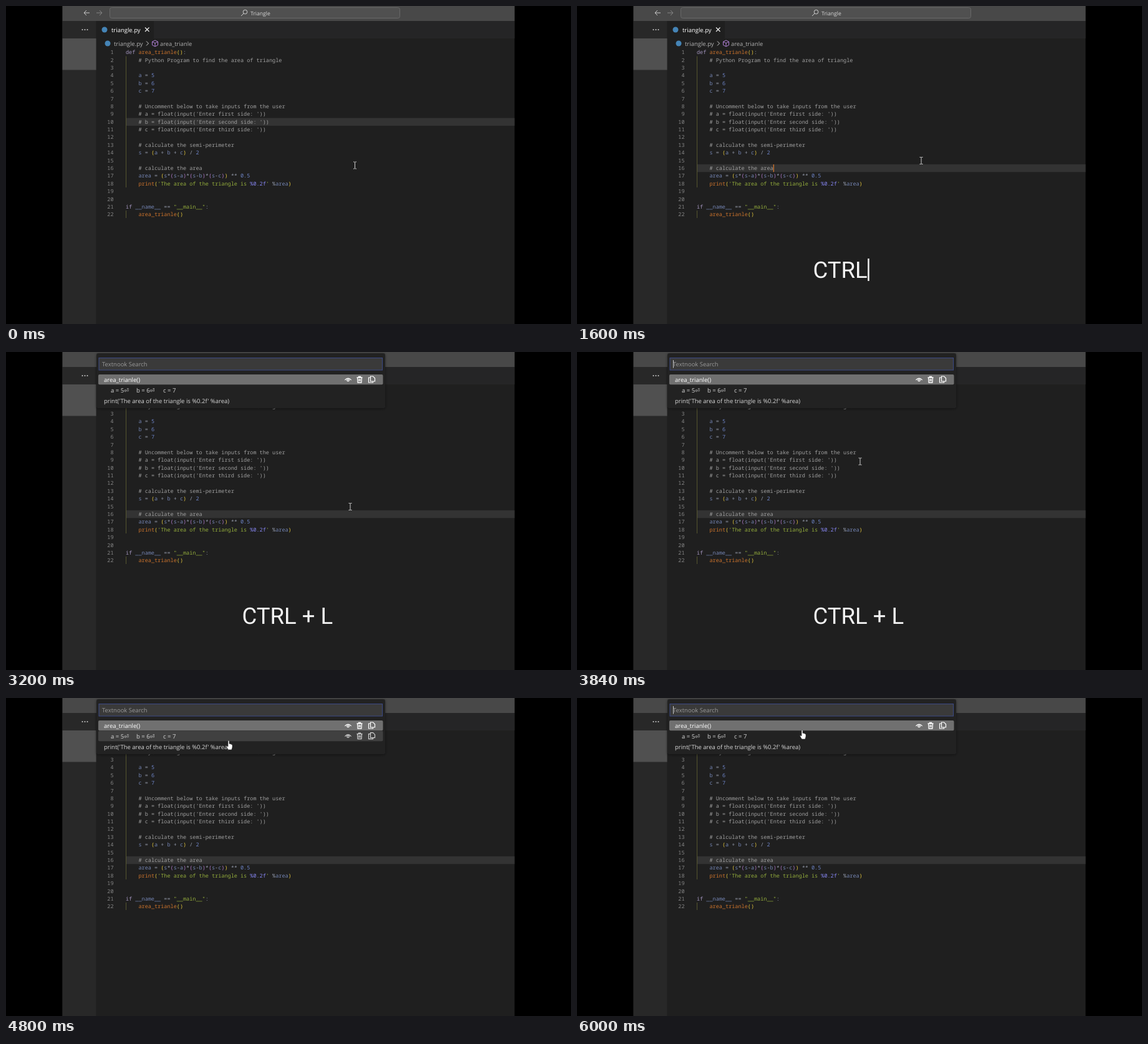
Write an HTML page that moves like this. It is 906 by 510 pixels and loops after 6.24 s.

```html
<!DOCTYPE html>
<html lang="en">
<head>
<meta charset="utf-8">
<title>Clipboard search in an editor</title>
<style>
html, body { margin: 0; width: 100%; height: 100%; overflow: hidden; background: #000; }
svg { display: block; }
text { white-space: pre; text-rendering: geometricPrecision; font: 9.5px "Open Sans", sans-serif; fill: #d6d6d6; }
.code text { font: 8.53px "Noto Sans Mono", monospace; }
.num { text-anchor: end; fill: #858585 !important; }
.line { fill: none; stroke: #ccc; }
.keyword { fill: #a294bd; }
.call { fill: #cc732c; }
.name { fill: #7485b4; }
.number { fill: #6d84c6; }
.string { fill: #94ad3c; }
.format { fill: #8585f0; font-weight: 500; }
.comment { fill: #a0a0a0; }
.op { fill: #9298a8; }
.b1 { fill: #e6c83c; }
.b2 { fill: #b27acb; }
#keys { font: 36.5px Roboto, sans-serif; fill: #f4f4f4; }
</style>
</head>
<body>
<svg width="906" height="510" viewBox="0 0 906 510">
  <defs>
    <filter id="shadow" x="-10%" y="-20%" width="120%" height="150%">
      <feDropShadow dx="0" dy="1" stdDeviation="2" flood-color="#000" flood-opacity=".45"/>
    </filter>
    <g id="actions" class="line" style="stroke:#fff">
      <path d="M-5 1Q0-5 5 1" stroke-width="1.200"/><circle cy="1" r="1.700" stroke-width="1.300"/>
      <path d="M14-3h9M17-3v-1.500h3V-3M15-3l.6 8h5.800l.6-8M17.500-1v4M19.500-1v4" stroke-width="1.300"/>
      <path d="M36-5h4l3 3v5h-7zM36-3h-3v8h7v-2" stroke-width="1.200"/>
    </g>
  </defs>

  <rect x="90.500" width="725" height="510" fill="#1f1f1f"/>
  <rect x="90.500" width="725" height="24" fill="#484848"/>
  <rect x="90.500" y="24" width="725" height="28" fill="#252526"/>
  <rect x="90.500" y="24" width="54" height="486" fill="#282828"/>
  <rect x="90.500" y="52" width="54" height="50.500" fill="#505050"/>
  <rect x="144.500" y="24" width="92.500" height="28" fill="#1f1f1f"/>
  <g fill="#ccc"><circle cx="122.500" cy="38" r="1"/><circle cx="126.500" cy="38" r="1"/><circle cx="130.500" cy="38" r="1"/></g>

  <g id="title">
    <rect x="166.500" y="2.500" width="465" height="17" rx="3" fill="#505050" stroke="#686868"/>
    <path class="line" d="M134 11h-9m4-4l-4 4l4 4"/>
    <path class="line" d="M145 11h9m-4-4l4 4l-4 4" style="stroke:#858585"/>
    <g class="line"><circle cx="383.500" cy="9.500" r="3.300"/><path d="M381 12l-4 4"/></g>
    <text x="392" y="15" style="font-size:8.600px">Triangle</text>
  </g>
  <circle cx="158" cy="38" r="4.500" fill="#4584b6"/>
  <text x="169" y="41.500" style="fill:#fff;font-weight:500">triangle.py</text>
  <path class="line" style="stroke:#eee" d="M223 34.500l6.500 6.500m0-6.500l-6.500 6.500" stroke-width="1.200"/>
  <circle cx="163" cy="60" r="4.500" fill="#4584b6"/>
  <text x="173" y="63.500" style="fill:#b0b0b0">triangle.py</text>
  <path class="line" d="M225 56.500l3.500 3.500l-3.500 3.500"/>
  <path class="line" style="stroke:#b180d7" d="M239 55l4.500 2.300v5.400l-4.500 2.300l-4.500-2.300v-5.400zM234.500 57.300l4.500 2.300l4.500-2.300M239 59.600v5.400"/>
  <text x="247" y="63.500" style="fill:#b0b0b0;font-size:9.300px">area_trianle</text>

  <rect id="current" x="192" width="623.500" height="12.400" fill="#333"/>
  <path d="M192.500 80.500V291M192.500 328V340" stroke="#55552f"/>
  <g id="code" class="code"></g>
  <rect id="caret" x="314.700" y="254" width="1.200" height="12.300" fill="#e07b2c"/>

  <g id="popup">
    <rect x="145" y="2" width="463" height="88" rx="3" fill="#222223" filter="url(#shadow)"/>
    <rect x="149" y="9.500" width="454.500" height="19.500" fill="#3a3a3a" stroke="#3c4a86"/>
    <text x="154" y="23" style="fill:#999">Textnook Search</text>
    <rect id="inputCaret" x="154" y="13" width="1" height="12.500" fill="#ccc"/>
    <rect x="148" y="36" width="456.500" height="16.300" rx="2" fill="#707070"/>
    <g id="hover">
      <rect x="148" width="456.500" height="16.800" rx="2" fill="#404040"/>
      <use href="#actions" x="548.500" y="8.300" opacity=".75"/>
    </g>
    <use href="#actions" x="548.500" y="44"/>
    <text x="157" y="47.500" style="fill:#fff">area_trianle()</text>
    <text x="168" y="64.500">a = 5⏎</text><text x="209" y="64.500">b = 6⏎</text><text x="252" y="64.500">c = 7</text>
    <text x="157" y="82">print('The area of the triangle is %0.2f' %area)</text>
  </g>

  <text id="keys" x="378.500" y="436"></text>
  <rect id="keysCaret" y="405" width="2.500" height="36" fill="#eee"/>
  <path id="beam" class="line" d="M-2.500-5.500H-.8L0-4.800L.8-5.500H2.500M0-4.800V4.800M-2.500 5.500H-.8L0 4.800L.8 5.500H2.500"/>
  <path id="hand" fill="#fff" stroke="#222" stroke-width=".6" d="M-1 1Q0-.8 1 1V5.500Q2 4.500 2.800 6Q4 5.200 4.500 6.500Q6 6 6 8V11L4.800 15H-.5L-3.500 10Q-3 8-1 10Z"/>
</svg>
<script>
const LOOP = 6240, STEP = 80, PITCH = 12.38, CHAR = 5.12;
const $ = id => document.getElementById(id);
const source = `def area_trianle():
    # Python Program to find the area of triangle

    a = 5
    b = 6
    c = 7

    # Uncomment below to take inputs from the user
    # a = float(input('Enter first side: '))
    # b = float(input('Enter second side: '))
    # c = float(input('Enter third side: '))

    # calculate the semi-perimeter
    s = (a + b + c) / 2

    # calculate the area
    area = (s*(s-a)*(s-b)*(s-c)) ** 0.5
    print('The area of the triangle is %0.2f' %area)


if __name__ == "__main__":
    area_trianle()`;

const span = (kind, text) => `<tspan class="${kind}">${text}</tspan>`;

function highlight(line) {
  let depth = 0;
  return line.replace(/#.*|'[^']*'|"[^"]*"|[\d.]+|\w+|[()]|[^\s\w()]/g, token => {
    if (token[0] === "#") return span("comment", token);
    if (/^['"]/.test(token)) return span("string", token.replace("%0.2f", span("format", "%0.2f")));
    if (token === "(") return span("b" + ++depth, token);
    if (token === ")") return span("b" + depth--, token);
    if (/^(def|if)$/.test(token)) return span("keyword", token);
    if (/^(print|area_trianle)$/.test(token)) return span("call", token);
    if (/^\d/.test(token)) return span("number", token);
    return span(/^\w/.test(token) ? "name" : "op", token);
  });
}

$("code").innerHTML = source.split("\n").map((line, i) => {
  const y = 77.3 + i * PITCH, indent = line.search(/\S|$/);
  return `<text class="num" x="172.5" y="${y}">${i + 1}</text>` +
    `<text x="${192 + indent * CHAR}" y="${y}">${highlight(line.trim())}</text>`;
}).join("");

// Pointer hot spot: time, x, y
const path = [
  [0, 559.5, 255.5], [1120, 559.5, 255.5], [1440, 552, 248], [3520, 552, 248],
  [4160, 356, 103], [4320, 356, 103], [4800, 357, 68], [5440, 357, 68],
  [5760, 361, 51], [LOOP, 361, 51]
];

function pointerAt(t) {
  const i = path.findIndex(p => p[0] > t);
  const [t0, x0, y0] = path[i - 1], [t1, x1, y1] = path[i];
  const k = (t - t0) / (t1 - t0), e = k * k * (3 - 2 * k);
  return [x0 + (x1 - x0) * e, y0 + (y1 - y0) * e];
}

const phrase = ["", "C", "CT", "CTR", "CTRL", "CTRL +", "CTRL + L"];
const show = (id, on) => $(id).style.display = on ? "" : "none";
const move = (id, x, y) => $(id).setAttribute("transform", `translate(${x} ${y})`);

function draw(t) {
  const open = t >= 2640, typing = t >= 1360 && t < 4000;
  $("current").setAttribute("y", 68.2 + ((t < 160 ? 10 : 16) - 1) * PITCH);
  show("caret", t >= 160 && !open && (t - 160) % 1000 < 500);
  show("title", !open);
  show("popup", open);
  show("inputCaret", t < 3200 || (t >= 3680 && t < 4000) || (t >= 4000 && t % 1000 < 500));

  const keys = $("keys");
  keys.textContent = typing ? phrase[Math.min(6, Math.floor((t - 1280) / STEP))] : "";
  show("keysCaret", typing && (t < 1440 || (t - 1440) % 960 < 480));
  if (typing) $("keysCaret").setAttribute("x", Math.min(523.7, 379 + keys.getComputedTextLength()));

  const [x, y] = pointerAt(t), row = Math.floor((y - 35.5) / 16.9);
  const inList = open && y < 86;
  show("beam", !inList);
  show("hand", inList);
  move("beam", x, y);
  move("hand", x, y);
  show("hover", inList && row > 0);
  move("hover", 0, 35.5 + row * 16.9);
}

const start = performance.now();
function tick() {
  const t = (performance.now() - start) % LOOP;
  draw(Math.floor(t / STEP) * STEP);
  requestAnimationFrame(tick);
}
tick();
</script>
</body>
</html>
```
